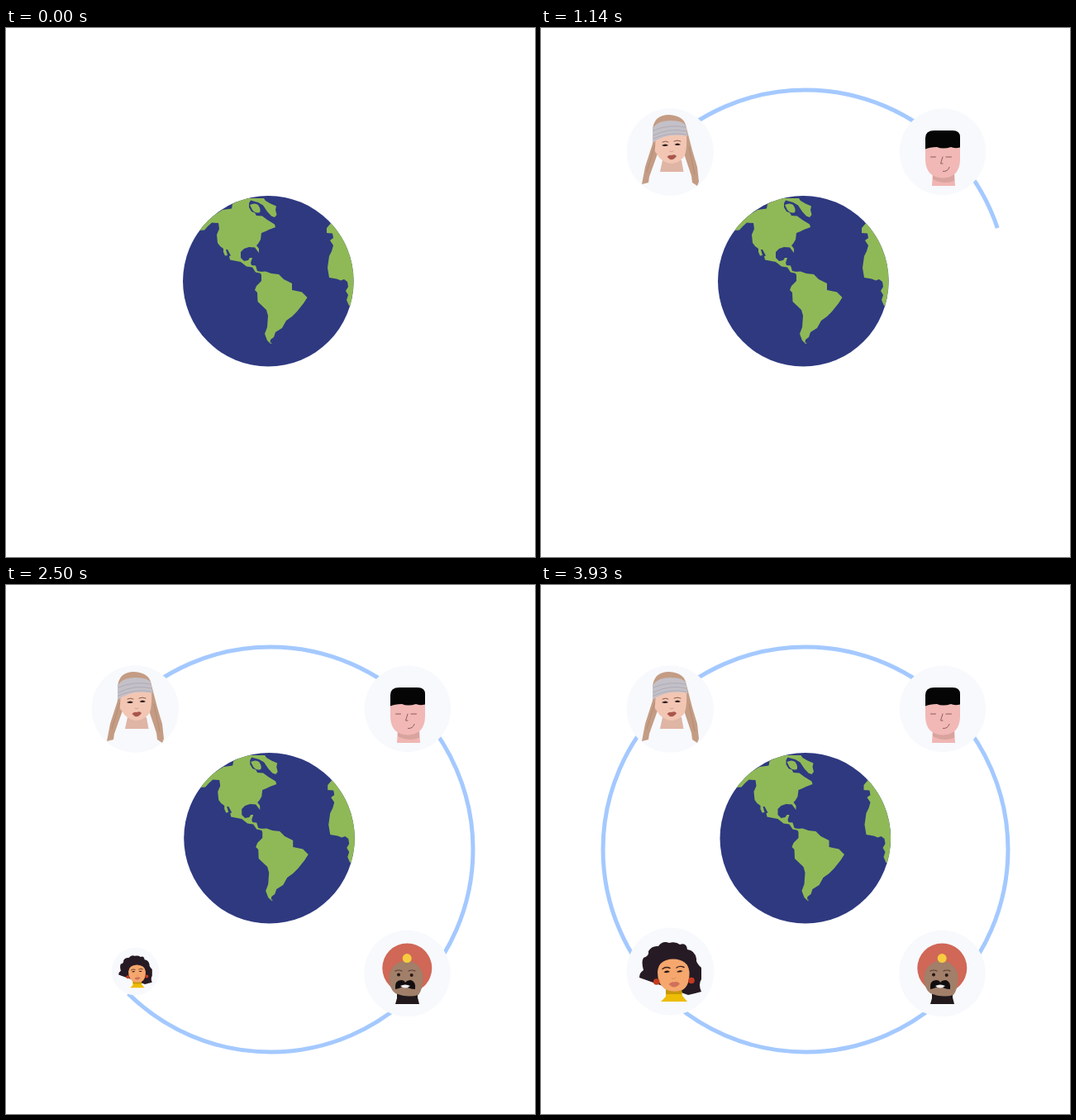
Write an HTML page that moves like this. It is 640x640 px and loops after 4070 ms.

```html
<!DOCTYPE html>
<html lang="en">
<head>
<meta charset="utf-8">
<title>Connected globe</title>
<style>
  html, body { margin: 0; width: 100%; height: 100%; overflow: hidden; background: #fff; }
  svg { display: block; width: 100vw; height: 100vh; }
  .ring path { fill: none; stroke: #a4c9ff; stroke-width: 5; }
  .disc { fill: #f7f9fc; }
  .line { fill: none; stroke-linecap: round; }
</style>
</head>
<body>
<svg viewBox="0 0 640 640">
  <clipPath id="sphere"><circle cx="317.3" cy="306.3" r="103.3"/></clipPath>

  <g id="globe">
    <circle cx="317.3" cy="306.3" r="103.3" fill="#2e3980"/>
    <g clip-path="url(#sphere)" fill="#8fb957">
      <path d="M232 245L241 236 249 228 262 220 273 218.500 274 213Q284 207 294 206L312 206 314 209 320 212.500 327 215.500 326 220 327.500 226 325 229 321 227.500 316 222 311 214.500 305 211 296 208.500 294 212 294 217 297 222 301 223.500 303 227 310 227.500 316 232 325 237.500 326 241 318 244 314 246 309 248 308 256 305 261 303 263 306 267 306 272 301 265.500 294 265 288 267 284 271 284 278 288 282 293 281 295 278 298 278 296 284 297 287 302 287.500 304 294 309 295 309 297 302 295.500 298 289.500 291 288.500 284 283 271 280.500 270 276 272 275.500 268 268 266 268 268 275 265 275.500 263 271 263 267 259 264 256 260 255 250 258 243 257 236 249 235.500 244 240 240 244.500Z"/>
      <path d="M295 214Q301 211 305 214 309 220 307 223 302 225 298 220Z"/>
      <path d="M307 295L314 294.500 321 297 330 298 336 304 346 309 346 317 358 319.500 364.500 326 360 333 352 343 346 349 339 354 334 363 326 368 324 374 320 377 319.500 380.500 322 381 320 382 316 378 313 370 316 362 317 348 315 341 304.500 331 304 320 301 317 303 312 309 306 309 299Z"/>
      <path d="M394 235L388 242 388 248 395 248.500 396 254 392 257 396 263 394 270 391 276 389 290 391 302 400 303.500 405 305.500 409 304 413 307 414 313 411 318 414 323 412 329 415 336H430V235Z"/>
    </g>
  </g>

  <g class="ring" id="ring"></g>

  <g class="avatar">
    <circle class="disc" cx="156.300" cy="150" r="52.700"/>
    <path d="M135 124Q136 105 155 105 174 106 176 121L183 148 189 168 191 186 189 191 183 187 182 179 174 155 170 125 142 126 141 152 131 180 130 187 122 189 126 168 135 140Z" fill="#c49c84"/>
    <path class="line" d="M138 141L128 174M179 144L186 177" stroke="#b58d77"/>
    <path d="M147 160H170L172.500 174H144Z" fill="#dfb5a5"/>
    <path d="M139 130L176 127Q177 149 173 156 166 164 157 164 145 162 140 152 137 150 138 145Z" fill="#f2c6b3"/>
    <path d="M135 122Q140 112 157 112 172 112 175 118L177.500 131Q153 126 135 139Z" fill="#c4c0c8"/>
    <path class="line" d="M136 124Q155 116 175 120M136 130Q156 120 176 125M136 134Q156 125 176 129" stroke="#aaa6b1" stroke-width=".8"/>
    <path d="M146 142Q151 139 154 142 150 144 146 142ZM161.500 141Q165 138 169 141 165 143 161.500 141Z" fill="#2a1918"/>
    <path class="line" d="M147 138Q151 136 154 138M161 137Q165 135 169 137" stroke="#8b5a48"/>
    <path class="line" d="M156 149Q158 151 160 149" stroke="#d69f8b"/>
    <path d="M152.500 156Q155 153 158 154 162 152 164 155 161 160 156 159Z" fill="#a9564d"/>
  </g>

  <g class="avatar">
    <circle class="disc" cx="486" cy="149.700" r="52.300"/>
    <path d="M474 174H500L501 191H473Z" fill="#f0b6b3"/>
    <path d="M474 178Q487 184 500 176V185Q487 190 474 183Z" fill="#d9a39e"/>
    <path d="M465 142H507V160Q506 181 486 181.500 466 181 465 160Z" fill="#f1b8b6"/>
    <path d="M465 146.500V133Q465 124 476 124H498Q507 124 507 132V144.500Q500 146 496 144 486 147 479 144 470 144 465 146.500Z" fill="#050505"/>
    <path class="line" d="M471.500 156H477.500M490 156H496.500M486 156L483.500 164H486M486.500 173.500Q492 174 494 168.500" stroke="#8a5f5e"/>
  </g>

  <g class="avatar">
    <circle class="disc" cx="485.500" cy="470" r="52.300"/>
    <circle cx="485.300" cy="463.500" r="30" fill="#d06757"/>
    <path d="M473 492H498V499L500 507H471L473 500Z" fill="#21191b"/>
    <path d="M463.500 474Q465 457 485 454 503 458 504.500 474 504 490 499 496 486 500 471 494 463 488 463.500 474Z" fill="#a17f69"/>
    <circle cx="485.200" cy="451.600" r="5.500" fill="#f7cc3f"/>
    <circle cx="475" cy="471.500" r="2" fill="#241614"/>
    <circle cx="490.700" cy="472" r="2" fill="#241614"/>
    <path class="line" d="M471 467Q475 465 479 467M487 467Q491 465 495 467" stroke="#5a4034" stroke-width="1.200"/>
    <path d="M471 489Q470 478 478 478 482 478 483 481 485 478 490 478 496 480 495 489 488 489 483 485 476 488 471 489Z" fill="#120e10"/>
    <path d="M477 485Q483 482 489 485 483 490 477 485Z" fill="#f1eeee"/>
  </g>

  <g class="avatar">
    <circle class="disc" cx="156.500" cy="467.500" r="53"/>
    <path d="M119 475Q119 469 124 466 121 456 124 451 131 449 130 443 134 436 142 437 147 430 155 433 163 431 168 435 176 432 177 441 186 442 188 452 187 457 194 463 194 473 194 477 190 483 194 492 187 494 178 496 170 493H148Q139 497 134 492 124 492 124 486 118 482 119 475Z" fill="#261a24"/>
    <path d="M151 488H170L171 497 177 504H145L151 498Z" fill="#edbc04"/>
    <path d="M151 488H170V495H151Z" fill="#c79809"/>
    <path d="M141 468Q142 453 160 452.500 178 453 179.500 468 180 485 171 490 160 494 150 489 141 483 141 468Z" fill="#f5a76d"/>
    <circle cx="139.700" cy="480" r="3.800" fill="#c43b20"/>
    <circle cx="182" cy="478.500" r="3.800" fill="#c43b20"/>
    <path d="M148.500 468.500Q152 465 156 468 152 470 148.500 468.500ZM164 468Q168 465 171.500 467 168 469.500 164 468Z" fill="#2a1719"/>
    <path class="line" d="M147 464.500Q151 461 156 463.500M164 463Q168 460 173 462.500" stroke="#3a211e" stroke-width="1.400"/>
    <path class="line" d="M158 476Q161 478 163 475" stroke="#dd8d58"/>
    <path d="M154.500 483Q158 479.500 161 480.500 165 479 168 482.500 161 490 154.500 483Z" fill="#d0705c"/>
  </g>
</svg>

<script>
  const LOOP = 4070, FPS = 14, LAST = 55;
  const POP = 380;
  const popStarts = [15, 600, 1530, 2300];
  // start and end of each quarter of the ring, in ms
  const arcTimes = [[281, 903], [779, 1777], [1666, 2536], [2502, 3624]];

  const clamp = x => Math.min(1, Math.max(0, x));
  const ease = x => (1 - Math.cos(Math.PI * clamp(x))) / 2;

  const ring = document.getElementById('ring');
  const globe = document.getElementById('globe');

  const point = deg => {
    const a = deg * Math.PI / 180;
    return `${320 + 245 * Math.cos(a)} ${320 + 245 * Math.sin(a)}`;
  };

  const arcs = arcTimes.map(([from, to], i) => {
    const el = document.createElementNS('http://www.w3.org/2000/svg', 'path');
    const deg = -135 + 90 * i;
    el.setAttribute('d', `M${point(deg)}A245 245 0 0 1 ${point(deg + 90)}`);
    el.setAttribute('pathLength', 1);
    ring.append(el);
    return { el, from, to };
  });

  const avatars = [...document.querySelectorAll('.avatar')].map((el, i) => {
    const disc = el.querySelector('.disc');
    return { el, start: popStarts[i], x: +disc.getAttribute('cx'), y: +disc.getAttribute('cy') };
  });

  function draw(now) {
    const step = Math.min(LAST, Math.floor((now % LOOP + 5) * FPS / 1000));
    const t = step * 1000 / FPS;

    globe.setAttribute('transform', `translate(${2.5 * clamp((t - 1150) / 2780)} 0)`);

    for (const { el, from, to } of arcs) {
      const p = ease((t - from) / (to - from));
      el.style.display = p ? '' : 'none';
      el.setAttribute('stroke-dasharray', `${p} 2`);
    }

    for (const { el, start, x, y } of avatars) {
      const s = ease((t - start) / POP);
      el.style.display = s ? '' : 'none';
      el.setAttribute('transform', `translate(${x} ${y}) scale(${s}) translate(${-x} ${-y})`);
    }
  }

  const origin = performance.now();
  function tick() {
    draw(performance.now() - origin);
    requestAnimationFrame(tick);
  }
  tick();
</script>
</body>
</html>
```
